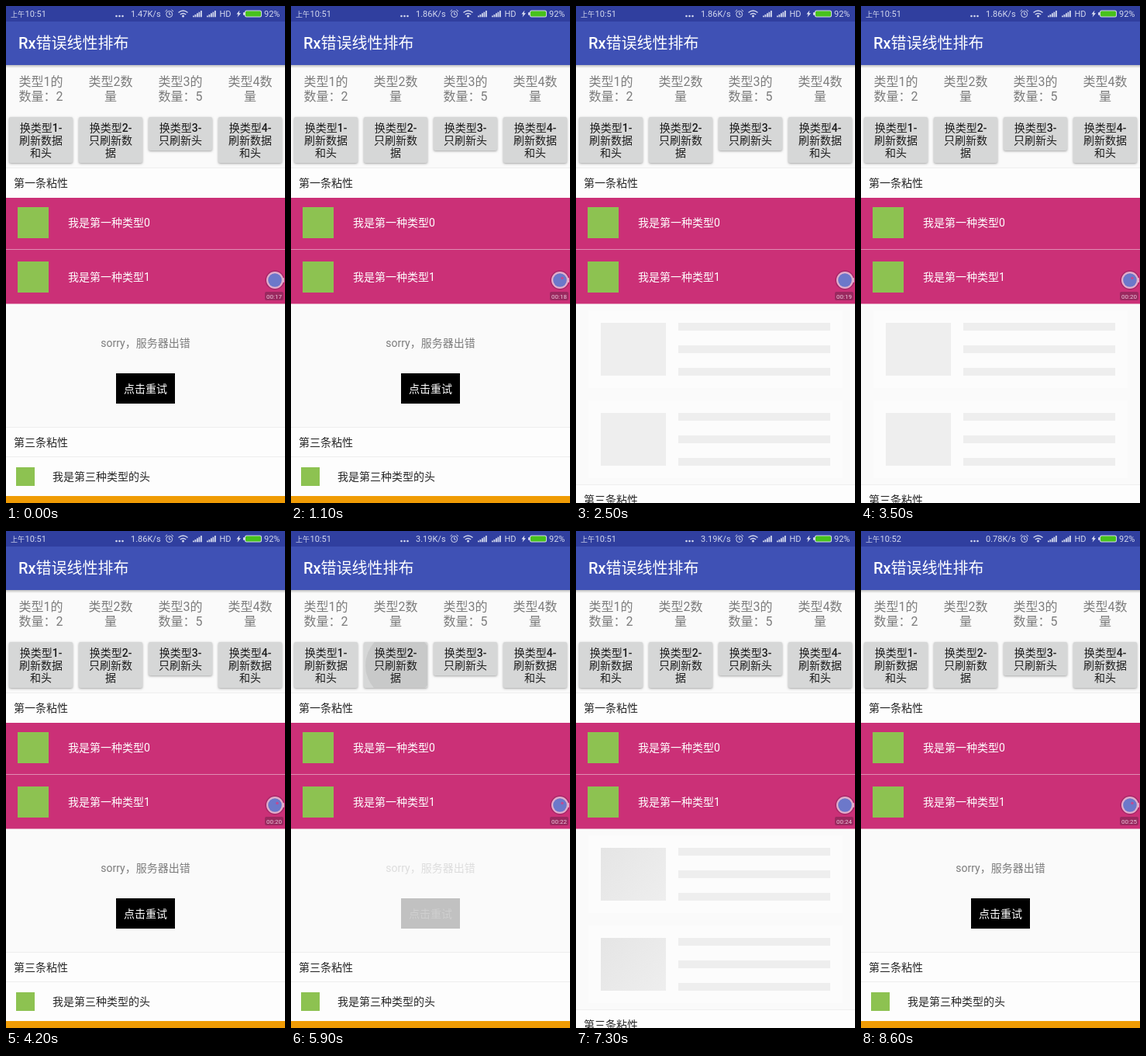
Recreate the animation shown at these times as an HTML page with a canvas. Size 360x640 px, loop 9.1 s.

```html
<!DOCTYPE html>
<html lang="zh-CN">
<meta charset="utf-8">
<style>
  html, body { margin: 0; width: 360px; height: 640px; overflow: hidden; background: #fafafa }
  canvas { display: block }
</style>
<canvas width="360" height="640"></canvas>
<script>
const ctx = document.querySelector('canvas').getContext('2d');
const LOOP = 9100, STEP = 100;
const FAMILY = "Roboto, 'Noto Sans CJK SC', 'Noto Sans CJK', sans-serif";
const GREEN = '#8dc251', ICON = '#d3d8ee';

const SECONDS = [0, 800, 2000, 3000, 4400, 5600, 6400, 7200, 8100];
const DOT_ON = [200, 1100, 2600, 3500, 5100, 5900, 6800, 7700, 8600];

function text(str, x, y, size, color, align = 'left', weight = 400) {
  ctx.font = `${weight} ${size}px ${FAMILY}`;
  ctx.textAlign = align;
  ctx.fillStyle = color;
  ctx.fillText(str, x, y);
}

function rect(x, y, w, h, color, radius = 0) {
  ctx.fillStyle = color;
  ctx.beginPath();
  ctx.roundRect(x, y, w, h, radius);
  ctx.fill();
}

function disc(x, y, r, color) {
  ctx.fillStyle = color;
  ctx.beginPath();
  ctx.arc(x, y, r, 0, 7);
  ctx.fill();
}

function stroke(path, color, width = 1) {
  ctx.strokeStyle = color;
  ctx.lineWidth = width;
  ctx.stroke(new Path2D(path));
}

function withAlpha(alpha, draw) {
  if (alpha <= 0) return;
  ctx.save();
  ctx.globalAlpha = alpha;
  draw();
  ctx.restore();
}

// Accelerate-decelerate progress from 0 to 1
function ramp(t, start, duration) {
  const p = Math.min(1, Math.max(0, (t - start) / duration));
  return (1 - Math.cos(p * Math.PI)) / 2;
}

function statusBar(t) {
  rect(0, 0, 360, 20, '#303f9f');
  text('上午', 6, 13.5, 9, ICON);
  text(t < 8200 ? '10:51' : '10:52', 24.5, 14, 11, ICON);
  for (let i = 0; i < 3; i++) disc(142.5 + i * 4, 13, 1.3, ICON);
  const speed = t < 900 ? '1.47' : t < 5800 ? '1.86' : t < 8200 ? '3.19' : '0.78';
  text(speed + 'K/s', 161, 14, 11, ICON);
  stroke('M206.7 10.5a4 4 0 1 0 8 0a4 4 0 1 0-8 0M210.7 8v3h2M205.5 7l2.5-2.2M216 7l-2.5-2.2', ICON);
  stroke('M222.5 8.5q6-5 12 0M224.8 11q3.7-3 7.4 0', ICON, 1.5);
  disc(228.5, 13, 1.5, ICON);
  for (const x of [241, 259])
    for (let i = 0; i < 5; i++) rect(x + i * 2.5, 12.5 - i * 1.6, 1.8, 1.8 + i * 1.6, ICON);
  text('HD', 275.5, 14, 11, ICON);
  ctx.fillStyle = '#e5e8f5';
  ctx.fill(new Path2D('M301.5 5.5l-4 5h2.3l-1.3 4 4.5-5.3h-2.5z'));
  rect(308, 5.5, 22, 9, ICON, 2.5);
  rect(306, 8, 2, 4, ICON, 1);
  rect(309, 6.5, 20, 7, '#48c21c', 1.5);
  text('92%', 333, 14, 11, ICON);
}

function toolbar() {
  const shade = ctx.createLinearGradient(0, 76, 0, 80);
  shade.addColorStop(0, 'rgba(0,0,0,.24)');
  shade.addColorStop(1, 'rgba(0,0,0,0)');
  rect(0, 76, 360, 4, shade);
  rect(0, 20, 360, 56, '#3f51b5');
  text('Rx', 16, 55, 20, '#fff', 'left', 500);
  text('错误线性排布', 38.5, 55, 20, '#fff');
}

function button(column, lines, ripple) {
  const x = 4 + column * 90, h = 11 + lines.length * 16;
  ctx.save();
  ctx.shadowColor = 'rgba(0,0,0,.35)';
  ctx.shadowBlur = 3;
  ctx.shadowOffsetY = 1;
  rect(x, 143, 82, h, '#d6d7d7', 2);
  ctx.restore();
  if (ripple >= 0 && ripple < 400) {
    ctx.save();
    ctx.beginPath();
    ctx.rect(x, 143, 82, h);
    ctx.clip();
    const fade = Math.min(1, (400 - ripple) / 200);
    disc(140, 173, 20 + ripple * .24, `rgba(0,0,0,${.065 * fade})`);
    ctx.restore();
  }
  lines.forEach((line, i) => text(line, x + 41, 162 + i * 16, 14, '#1c1c1c', 'center', 500));
}

function controls(ripple) {
  [['类型1的', '数量：2'], ['类型2数', '量'], ['类型3的', '数量：5'], ['类型4数', '量']]
    .forEach((lines, column) => lines.forEach((line, i) =>
      text(line, 45 + column * 90, 103 + i * 19, 16, '#7c7c7c', 'center')));
  button(0, ['换类型1-', '刷新数据', '和头']);
  button(1, ['换类型2-', '只刷新数', '据'], ripple);
  button(2, ['换类型3-', '只刷新头']);
  button(3, ['换类型4-', '刷新数据', '和头']);
}

function sticky(label, y) {
  rect(0, y, 360, 39, '#fdfdfd');
  rect(0, y, 360, 1, '#eeeeee');
  text(label, 10, y + 25, 14, '#262626');
}

function pinkRows() {
  rect(0, 247, 360, 136.5, '#cb3077');
  rect(0, 313, 360, 1, '#e08cb2');
  for (let i = 0; i < 2; i++) {
    rect(15, 259 + i * 70, 40, 40, GREEN);
    text('我是第一种类型' + i, 80, 284 + i * 70, 14, '#fff');
  }
}

function errorPanel() {
  text('sorry，服务器出错', 180, 439, 14, '#7c7c7c', 'center');
  rect(142, 473, 76, 39, '#000');
  text('点击重试', 180, 498, 14, '#fff', 'center');
}

function skeleton(shaded) {
  for (const y of [392, 508]) {
    const fill = ctx.createLinearGradient(32, y + 16, 116, y + 84);
    fill.addColorStop(0, shaded ? '#e5e5e5' : '#eeeeee');
    fill.addColorStop(1, '#eeeeee');
    rect(16, y, 328, 100, '#fcfcfc');
    rect(32, y + 16, 84, 68, fill);
    for (let i = 0; i < 3; i++) rect(132, y + 16 + i * 29, 196, 10, '#eeeeee');
  }
}

function thirdSection(shift) {
  const y = 542 + shift;
  sticky('第三条粘性', y);
  rect(0, y + 38, 360, 51, '#fdfdfd');
  rect(0, y + 38, 360, 1, '#eeeeee');
  rect(13, y + 52, 24, 24, GREEN);
  text('我是第三种类型的头', 60, y + 69, 14, '#262626');
  rect(0, y + 89, 360, 90, '#f09c05');
}

function recorder(t) {
  const second = SECONDS.findLastIndex(start => t >= start);
  disc(347, 353, 12.5, 'rgba(90,20,70,.3)');
  rect(354, 350, 5, 6, '#e3aecb', 1);
  disc(347, 353, 11, '#e3aecb');
  disc(347, 353, 8.8, '#6c78ca');
  if (t >= DOT_ON[second]) disc(350, 350.5, 1.8, '#c04a92');
  rect(334, 368, 24, 11, 'rgba(80,30,60,.4)', 2);
  text('00:' + (17 + second), 346, 376.5, 8, '#ecc9dc', 'center');
}

function render(t) {
  const first = t < 4700;
  const press = first ? 1400 : 5800;
  const load = press + 18, fail = first ? 3680 : 7780;
  // Old rows fade, the rows below slide, then new rows fade in
  const errorAlpha = 1 - ramp(t, load, 120) + ramp(t, fail + 370, 120);
  const skeletonAlpha = ramp(t, load + 370, 120) - ramp(t, fail, 120);
  const shift = 74 * (ramp(t, load + 120, 250) - ramp(t, fail + 120, 250));

  rect(0, 0, 360, 640, '#fafafa');
  statusBar(t);
  toolbar();
  controls(t - press);
  sticky('第一条粘性', 208);
  pinkRows();
  thirdSection(shift);
  withAlpha(errorAlpha, errorPanel);
  withAlpha(skeletonAlpha, () => skeleton(!first));
  recorder(t);
}

function frame() {
  render(Math.floor(performance.now() % LOOP / STEP) * STEP);
  requestAnimationFrame(frame);
}
frame();
</script>
</html>
```
